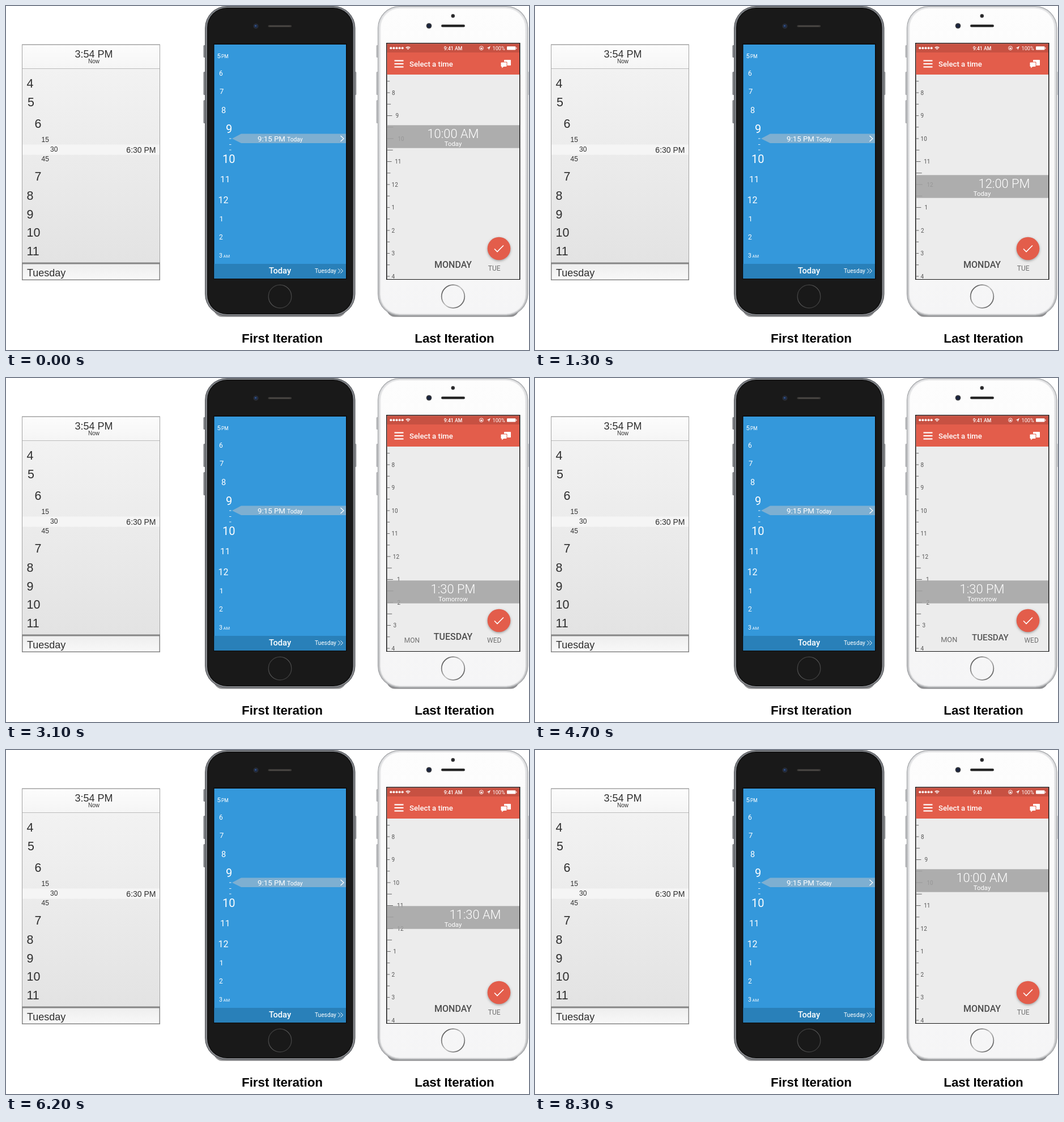
Recreate the animation shown at these times as an HTML page with a canvas. Size 923 by 607 pixels, loop 8.7 s.

```html
<!DOCTYPE html>
<html lang="en">
<head>
<meta charset="utf-8">
<title>Time picker iterations</title>
<style>
html, body { margin: 0; width: 100%; height: 100%; overflow: hidden; background: #fff; }
canvas { display: block; width: 923px; height: 607px; }
</style>
</head>
<body>
<canvas id="stage"></canvas>
<script>
const W = 923, H = 607, LOOP = 8700, STEP = 100;
const canvas = document.getElementById('stage');
const g = canvas.getContext('2d');
const dpr = window.devicePixelRatio || 1;
canvas.width = W * dpr;
canvas.height = H * dpr;

const ARIAL = '"Liberation Sans", Arial, sans-serif';
const ROBOTO = 'Roboto, sans-serif';
const RED = '#e35d4b', SCREEN = '#ececec';

// ---------- helpers ----------
const clamp = (v, a = 0, b = 1) => Math.min(b, Math.max(a, v));
const smooth = v => v * v * (3 - 2 * v);
const ramp = (t, a, b) => smooth(clamp((t - a) / (b - a)));
const mix = (a, b, k) => a + (b - a) * k;

function text(s, x, y, size, { font = ROBOTO, weight = 400, color = '#fff', align = 'left' } = {}) {
  g.font = `${weight} ${size}px ${font}`;
  g.fillStyle = color;
  g.textAlign = align;
  g.fillText(s, x, y);
}

function rect(x, y, w, h, color) {
  g.fillStyle = color;
  g.fillRect(x, y, w, h);
}

function round(x, y, w, h, r, color) {
  g.beginPath();
  g.roundRect(x, y, w, h, r);
  g.fillStyle = color;
  g.fill();
}

function disc(x, y, r, color) {
  g.beginPath();
  g.arc(x, y, r, 0, 7);
  g.fillStyle = color;
  g.fill();
}

function line(points, color, width = 1) {
  g.beginPath();
  points.forEach(([x, y], i) => i ? g.lineTo(x, y) : g.moveTo(x, y));
  g.strokeStyle = color;
  g.lineWidth = width;
  g.stroke();
}

function poly(points, color) {
  g.beginPath();
  points.forEach(([x, y]) => g.lineTo(x, y));
  g.closePath();
  g.fillStyle = color;
  g.fill();
}

function grad(x0, y0, x1, y1, ...colors) {
  const fill = g.createLinearGradient(x0, y0, x1, y1);
  colors.forEach((c, i) => fill.addColorStop(i / (colors.length - 1), c));
  return fill;
}

// Monotone cubic curve through [time, value] keys
function curve(keys, t) {
  const n = keys.length - 1;
  if (t <= keys[0][0]) return keys[0][1];
  if (t >= keys[n][0]) return keys[n][1];
  const rate = i => (keys[i + 1][1] - keys[i][1]) / (keys[i + 1][0] - keys[i][0]);
  const slope = i => {
    if (i === 0 || i === n) return 0;
    const a = rate(i - 1), b = rate(i);
    return a * b > 0 ? 2 * a * b / (a + b) : 0;
  };
  const i = keys.findIndex(k => t < k[0]) - 1;
  const [t0, v0] = keys[i], [t1, v1] = keys[i + 1];
  const h = t1 - t0, u = (t - t0) / h, w = 1 - u;
  return v0 * w * w * (1 + 2 * u) + v1 * u * u * (3 - 2 * u)
    + h * u * w * (slope(i) * w - slope(i + 1) * u);
}

// ---------- wireframe ----------
function wireframe() {
  const ink = '#2f2f2f';
  const put = (s, x, y, size, align) => text(s, x, y, size, { font: ARIAL, color: ink, align });
  rect(28, 67.5, 244, 416.5, '#a2a2a2');
  rect(29, 69, 242, 41, grad(0, 69, 0, 110, '#fcfcfc', '#f5f5f5'));
  rect(29, 110, 242, 1, '#bcbcbc');
  rect(29, 111, 242, 342, grad(0, 111, 0, 453, '#f2f2f2', '#e3e3e3'));
  rect(29, 244.5, 242, 18, 'rgba(255,255,255,.5)');
  rect(28, 452.5, 244, 31.5, '#858585');
  rect(29.5, 455.5, 241, 27, grad(0, 455, 0, 483, '#eeeeee', '#f8f8f8'));
  put('3:54 PM', 155, 91, 18, 'center');
  put('Now', 155, 101, 10, 'center');
  [[4, 37, 144], [5, 38.5, 177], [6, 51, 215], [7, 51, 308], [8, 37, 342],
   [9, 37, 375], [10, 37, 407], [11, 37, 440]].forEach(([n, x, y]) => put(n, x - .5, y, 21.5));
  put('15', 62.5, 239.5, 12);
  put('30', 78, 257, 12);
  put('45', 62.5, 273.5, 12);
  put('6:30 PM', 264.5, 258.5, 14, 'right');
  put('Tuesday', 37, 476.5, 18);
}

// ---------- phones ----------
function shell(x, [edge, metal, seam], face, keys) {
  for (const [y, h] of [[69, 22], [116, 41], [166, 41]]) round(x - 2.5, y, 4, h, 1.5, keys);
  round(x + 263.5, 116, 4, 41, 1.5, keys);
  round(x + 16, 520, 233, 28.5, 26, 'rgba(70,70,74,.6)');
  round(x, 0, 265.5, 547, 39, edge);
  round(x + 1, 1, 263.5, 545, 38, metal);
  round(x + 4, 3, 257.5, 541, 35, seam);
  round(x + 5.5, 4.5, 254.5, 538, 34, face);
}

function homeRing(x, color, width) {
  g.beginPath();
  g.arc(x, 512.5, 20.3, 0, 7);
  g.strokeStyle = color;
  g.lineWidth = width;
  g.stroke();
}

function blackPhone() {
  shell(351, ['#505256', grad(0, 0, 0, 547, '#808388', '#74777b', '#8b8d91'), '#101010'], '#191919',
    grad(348, 0, 352, 0, '#6a6c70', '#a0a2a5'));
  disc(441, 35.5, 4.6, '#2b2d33');
  disc(441, 35.5, 3, '#1c2c4c');
  disc(440.5, 35, 1.3, '#3d5f95');
  round(462.5, 33.8, 41.5, 3.4, 1.7, '#3c3a38');
  rect(465, 35, 36, 1, '#55514c');
  homeRing(483.5, grad(463, 492, 504, 533, '#333', '#555', '#333'), 1.3);

  rect(366, 66.5, 235.5, 415.5, '#0a0a0a');
  rect(367.5, 68, 232.5, 413, '#3498db');
  rect(367.5, 455, 232.5, 26, '#2980b9');
  [['6', 376, 123, 12], ['7', 377, 155, 13], ['8', 380, 189, 14.5], ['9', 388, 224, 20],
   ['10', 382, 277, 20], ['11', 378, 311, 15.5], ['12', 374.5, 348, 16], ['1', 376.5, 380, 13],
   ['2', 376, 412, 12]].forEach(([s, x, y, size]) => text(s, x, y, size));
  text('5', 372.5, 92, 11.5);
  text('PM', 380, 92, 8.5);
  text('3', 376, 444, 10.5);
  text('AM', 383.5, 444, 7.5);
  for (const y of [234, 244.5, 254]) rect(394, y - .5, 3.5, 1, '#e4f1fa');
  poly([[399, 234], [415, 225.5], [600, 225.5], [600, 242], [415, 242]], 'rgba(200,200,200,.5)');
  text('9:15 PM', 444, 238.5, 13.3);
  text('Today', 496, 238.5, 10.3);
  line([[590.5, 229], [596, 234], [590.5, 239]], '#fff', 1.2);
  text('Today', 483.5, 472, 14.7, { weight: 500, align: 'center' });
  text('Tuesday', 545, 471, 10.2);
  for (const x of [586, 590.5]) line([[x, 463.5], [x + 4, 467.5], [x, 471.5]], '#fff');
}

function statusBar() {
  rect(672, 66, 235, 16, '#c75142');
  for (let i = 0; i < 5; i++) disc(679.3 + i * 5.1, 74.3, 2, '#fff');
  for (const r of [1.2, 3.2, 5.2]) {
    g.beginPath();
    g.arc(709.5, 77.3, r, -Math.PI * .76, -Math.PI * .24);
    g.strokeStyle = '#fff';
    g.lineWidth = 1.3;
    g.stroke();
  }
  text('9:41 AM', 789, 77.6, 8.7, { weight: 500, align: 'center' });
  g.beginPath();
  g.arc(839, 74.3, 3.4, 0, 7);
  g.strokeStyle = '#fff';
  g.lineWidth = .9;
  g.stroke();
  rect(837.5, 73.5, 3, 2.5, '#fff');
  poly([[855, 70.8], [848.5, 74.2], [851.6, 74.6], [852, 77.8]], '#fff');
  text('100%', 858.5, 77.6, 9.2);
  round(884, 71.3, 15.5, 6.2, 1.2, '#fff');
  rect(900.3, 73.2, 1.2, 2.4, '#fff');
}

function header() {
  rect(672, 82, 235, 39, RED);
  for (const y of [96.5, 102, 107.5]) rect(685.5, y - 1.1, 16, 2.2, '#fff');
  text('Select a time', 712, 106.5, 13.2, { weight: 500 });
  round(879, 95, 12, 10, 1, '#fff');
  round(872.5, 98.5, 12, 8.5, 1, RED);
  round(873.5, 99.5, 10, 7.5, 1, '#fff');
  poly([[875, 106.5], [879, 106.5], [875, 109.5]], '#fff');
}

function whitePhone() {
  shell(656, ['#97999c', grad(0, 0, 0, 547, '#dcdddf', '#d2d3d5', '#c2c3c5'), '#ececed'],
    grad(0, 0, 0, 547, '#fdfdfd', '#f9f9f9', '#f5f5f6'), grad(653, 0, 657, 0, '#a5a6a9', '#d5d6d8'));
  disc(788.8, 17.5, 3.2, '#2a2a2c');
  disc(746.5, 35, 4.8, '#33353a');
  disc(746.5, 35, 3, '#1a2540');
  round(768, 32.8, 42, 4.4, 2.2, '#333');
  rect(770, 34.4, 38, 1.2, '#111');
  homeRing(789, grad(770, 496, 808, 529, '#4a4a4a', '#c4c4c4', '#555'), 1.8);
  rect(671, 65, 236.5, 418, '#151515');
  rect(672.5, 66.5, 233.5, 415.5, SCREEN);
}

// ---------- animated picker ----------
const hourY = h => 153 + 40.5 * (h - 8);

const BAND = [[800, 230.5], [1300, 318.5], [1700, 371], [2100, 377.5], [5400, 377.5],
  [5700, 373.5], [6200, 295.5], [7100, 242], [7700, 230.5]];

function pose(t) {
  return {
    y: curve(BAND, t),
    day: ramp(t, 2300, 3100) - ramp(t, 4500, 5200),
    held: ramp(t, 850, 1250) - ramp(t, 1700, 2100) + ramp(t, 5500, 5900) - ramp(t, 7100, 7600)
  };
}

function timeLabel(y) {
  const q = Math.round((8 + (y - 153) / 40.5) * 4);
  const h = Math.floor(q / 4), m = String(q % 4 * 15).padStart(2, '0');
  return `${(h + 11) % 12 + 1}:${m} ${h < 12 ? 'AM' : 'PM'}`;
}

// Ticks and labels move aside near the band
function ruler(center) {
  for (let h = 7.5; h <= 16; h += .5) {
    const y = hourY(h), d = Math.abs(y - center);
    const push = d < 90 ? 5.5 * (1 + Math.cos(Math.PI * d / 90)) : 0;
    rect(672, y - .5, 5.2 + push * .6, 1, '#666');
    if (h % 1 === 0) text((h + 11) % 12 + 1, 680.5 + push, y + 3.6, 10, { color: '#555' });
  }
}

function days(pos) {
  ['MONDAY', 'TUESDAY', 'WEDNESDAY'].forEach((name, i) => {
    const off = i - pos, near = clamp(1 - Math.abs(off));
    const shade = Math.round(mix(112, 78, near));
    text(near > .5 ? name : name.slice(0, 3), 789 + 72.7 * off, mix(466.5, 462, near), mix(12, 16, near),
      { weight: near > .5 ? 500 : 400, color: `rgb(${shade},${shade},${shade})`, align: 'center' });
  });
}

function band({ y, day, held }) {
  rect(672, y - 20.2, 235, 40.4, 'rgba(163,163,163,.85)');
  text(timeLabel(y), 789 + 39 * held, y + 2.7, 21.9, { weight: 300, align: 'center' });
  text(day > .5 ? 'Tomorrow' : 'Today', 789, y + 16.2, 11.4, { align: 'center' });
}

function button() {
  g.save();
  g.shadowColor = 'rgba(0,0,0,.35)';
  g.shadowBlur = 4 * dpr;
  g.shadowOffsetY = 1.5 * dpr;
  disc(870, 428, 20.3, RED);
  g.restore();
  line([[862, 428.5], [867, 433.5], [878, 422.5]], '#fff', 1.6);
}

function draw(t) {
  const p = pose(t);
  g.setTransform(dpr, 0, 0, dpr, 0, 0);
  rect(0, 0, W, H, '#fff');
  wireframe();
  blackPhone();
  whitePhone();
  g.save();
  g.beginPath();
  g.rect(672.5, 66.5, 233.5, 415.5);
  g.clip();
  ruler(p.y);
  days(p.day);
  band(p);
  button();
  statusBar();
  header();
  g.restore();
  const caption = { font: ARIAL, weight: 700, color: '#000', align: 'center' };
  text('First Iteration', 487.5, 593.5, 22.4, caption);
  text('Last Iteration', 791.5, 593.5, 22.4, caption);
}

const start = performance.now();
let last = -1;
function tick() {
  const t = Math.floor((performance.now() - start) % LOOP / STEP) * STEP;
  if (t !== last) draw(last = t);
  requestAnimationFrame(tick);
}
tick();
</script>
</body>
</html>
```
